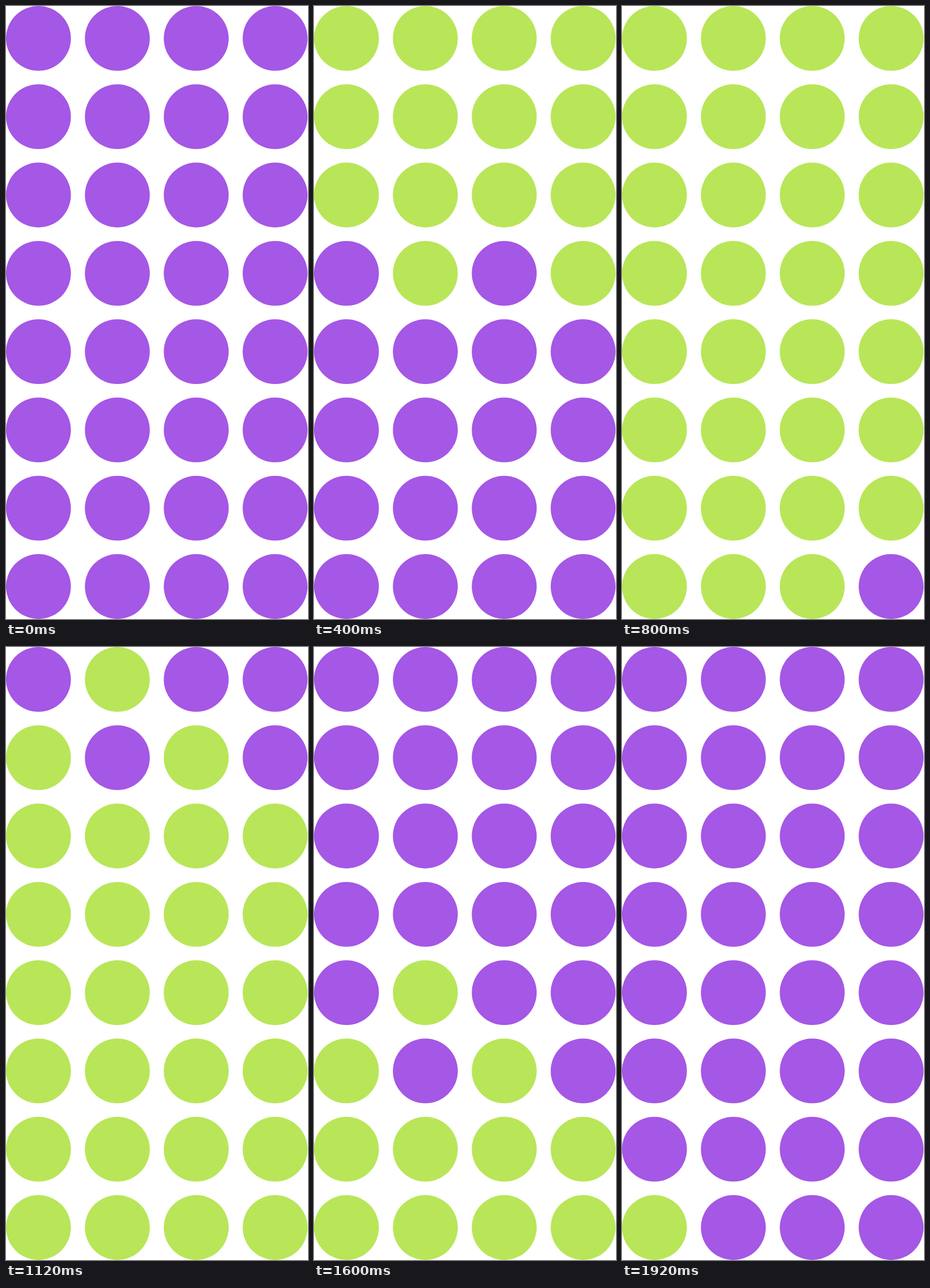
Recreate the animation shown at these times as an HTML page. Size 525 px wide and 1067 px high, loop 2 s.

```html
<!DOCTYPE html>
<html lang="en">
<head>
<meta charset="utf-8">
<title>Dots</title>
<style>
  html, body { margin: 0; width: 100%; height: 100%; overflow: hidden; background: #fff; }
  svg { display: block; width: 100%; height: 100%; }
</style>
</head>
<body>
<svg viewBox="0 0 525 1067"></svg>
<script>
const PURPLE = '#a557e5', GREEN = '#b8e658';
const LOOP = 2000, STEP = 80, COLS = 4, ROWS = 8;
const svg = document.querySelector('svg');

const dots = Array.from({ length: COLS * ROWS }, (_, i) => {
  const dot = document.createElementNS(svg.namespaceURI, 'circle');
  dot.setAttribute('cx', 56.4 + (i % COLS) * 137.15);
  dot.setAttribute('cy', 56.4 + Math.floor(i / COLS) * 136.3);
  dot.setAttribute('r', 56.4);
  return svg.appendChild(dot);
});

// Dots turn in blocks of two rows, in this order within each block.
const BLOCK = [0, 2, 3, 5, 7, 1, 6, 4];
const purpleOrder = dots.map((_, i) => (i >> 3) * 8 + BLOCK[i % 8]);
// The green sweep ends in the bottom right corner instead of the left.
const greenOrder = [...purpleOrder.filter(i => i !== 31), 31];

const greenStart = i => 72 + 24 * greenOrder.indexOf(i);
const purpleStart = i => 1000 + 30 * purpleOrder.indexOf(i);
const spans = dots.map((_, i) => [greenStart(i), purpleStart(i)]);

function draw(now) {
  const t = Math.floor((now % LOOP) / STEP) * STEP;
  dots.forEach((dot, i) => {
    const [from, to] = spans[i];
    dot.setAttribute('fill', t >= from && t < to ? GREEN : PURPLE);
  });
}

let start;
function tick(now) {
  start ??= now;
  draw(now - start);
  requestAnimationFrame(tick);
}
draw(0);
requestAnimationFrame(tick);
</script>
</body>
</html>
```
